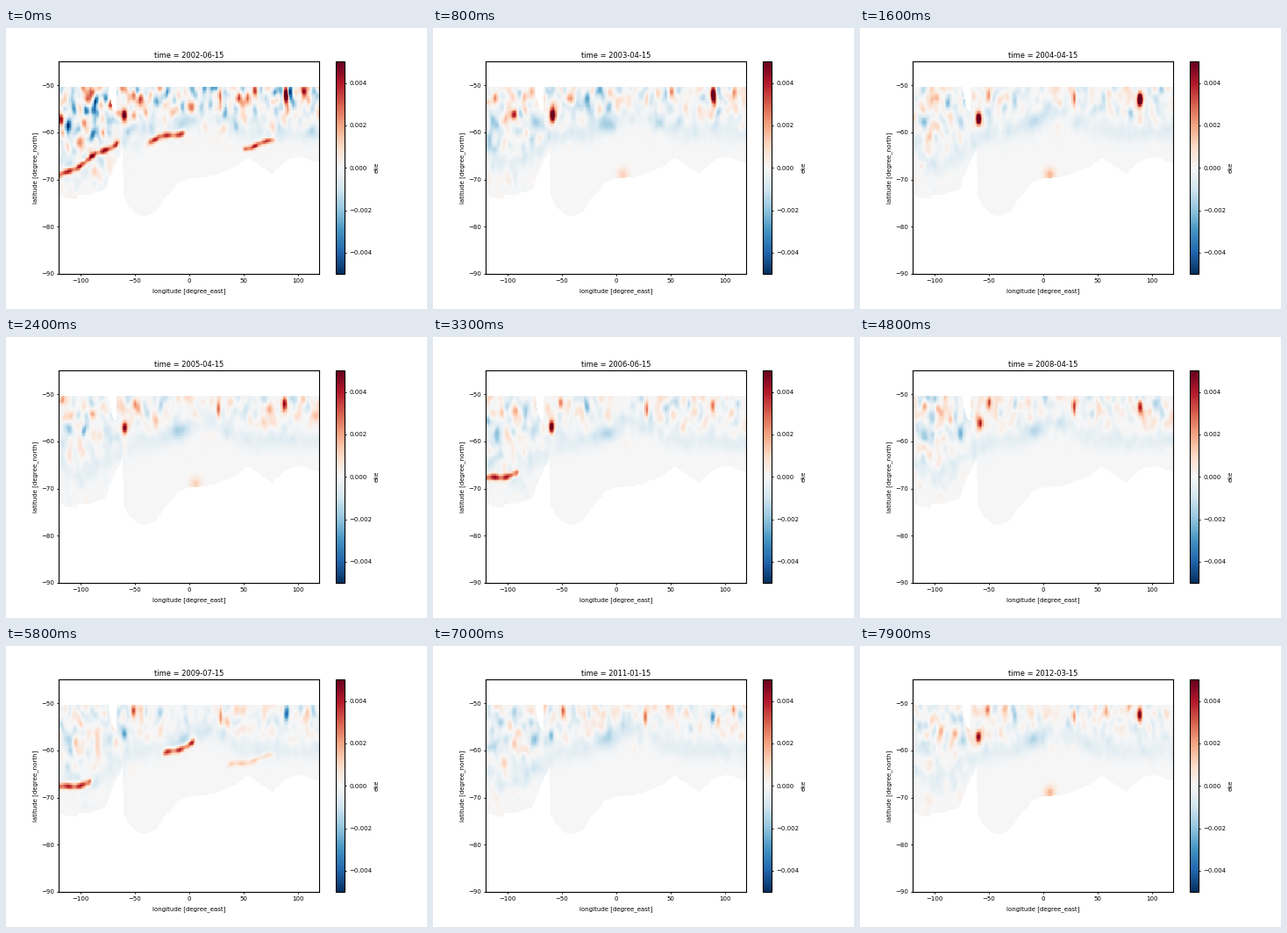
A matplotlib script for the animation above (8000 ms loop, 480 by 320 pixels).

```python
import numpy as np
import matplotlib.pyplot as plt
from matplotlib.animation import FuncAnimation

FRAMES, INTERVAL = 80, 100
MONTHS_PER_FRAME, START_HOLD = 1.5, 2

plt.rcParams.update({
    "font.family": "DejaVu Sans", "font.size": 10, "axes.linewidth": 1.6,
    "xtick.major.width": 1.4, "ytick.major.width": 1.4,
})

lon = np.arange(-119.5, 120)
lat = np.arange(-78.875, -50.5, 0.25)
depth = lat[:, None]

# Southern limit of open water, with the step at the peninsula
COAST = [
    (-120, -73.4), (-104, -74.2), (-102, -73.2), (-92, -73.2), (-77, -72.1),
    (-70, -67.6), (-60.6, -63.4), (-60.4, -73.2), (-55.6, -75.7), (-47.6, -77.3),
    (-41, -77.9), (-30, -76.6), (-23, -74.2), (-9.7, -70.6), (-1, -69.9),
    (21, -69.3), (43, -67.3), (54, -65.4), (76, -68.8), (89.5, -66),
    (102, -65.2), (120, -66.7),
]

# Eddies that stay near one place: lon, lat, strength, width, height
STANDING = [
    (-110, -58, -1.6, 3, 1.1), (-75, -58, -1.5, 3, 1.1), (-50, -52, 2.5, 1.5, 0.9),
    (-26, -52.7, -1.9, 1.7, 1.1), (-9, -58, -1.0, 6, 1.2), (28, -53, 2.6, 1.3, 1.3),
]
# The two strongest ones, which reverse for a while
REVERSING = [(-59, -56.7, 6, 1.8, 0.9), (88, -52.6, 6, 1.7, 1.0)]


def bell(x, centre, width):
    return np.exp(-0.5 * ((x - centre) / width) ** 2)


def spot(x, y, amp, sx, sy):
    return amp * bell(depth, y, sy) * bell(lon, x, sx)


def pulse(m, peak, period):
    """Positive half of a slow cycle."""
    return max(0, np.cos(2 * np.pi * (m - peak) / period))


def streak(x0, x1, y0, slope, amp, width=0.5):
    """Beaded line rising eastward from (x0, y0), with soft ends."""
    path = y0 + slope * (lon - x0) + 0.3 * np.sin(lon / 5)
    ends = np.clip((lon - x0) / 4 + 0.5, 0, 1) * np.clip((x1 - lon) / 4 + 0.5, 0, 1)
    beads = 1 + 0.25 * np.sin(lon * 0.55)
    return amp * ends * beads * bell(depth, path, width)


def water_mask():
    south = np.interp(lon, *np.transpose(COAST))
    west = np.interp(lat, [-56, -55, -50], [-67, -71, -75])[:, None]
    cape = (depth > -56) & (lon > west) & (lon < -67)
    return (depth > south) & ~cape


def smoother(axis, width):
    kernel = bell(axis[:, None], axis, width)
    return kernel / np.sqrt((kernel ** 2).sum(axis=0))


SMOOTH_X, SMOOTH_Y = smoother(lon, 1.9), smoother(lat, 0.85)
REACH = 5 + 6 * bell(lon, -100, 25)
ROUGH = bell(depth, -50.5, REACH) * (0.55 + 0.45 * np.abs(lon - 10) / 110)
PATH = -60 + 4.5 * bell(lon, 15, 18) - 7 * bell(lon, -98, 22)
CURRENT = -0.45 * bell(depth, PATH, 1.5)
WATER = water_mask()


def noise(m):
    rng = np.random.default_rng(500 + m)
    return SMOOTH_Y @ rng.standard_normal((lat.size, lon.size)) @ SMOOTH_X


def eddies(m):
    """Patchy eddies that last about two months and calm down with time."""
    n = 0.85 * noise(m) + 0.5 * noise(m - 1)
    gain = 0.55 + 1.0 * np.exp(-m / 7)
    return gain * ROUGH * np.sign(n) * np.abs(n) ** 1.4


def standing(m):
    rng = np.random.default_rng(900 + m)
    flip = 1 - 2 * bell(m, 94, 12)
    total = 0
    for x, y, amp, sx, sy in STANDING + REVERSING:
        dx, dy, change = rng.normal(0, [0.7, 0.3, 0.15])
        sign = flip if abs(amp) > 5 else 1
        total = total + spot(x + dx, y + dy, amp * sign * (1 + change), sx, sy)
    return total


def seasonal(m):
    """Winter streaks along the ice edge and an autumn patch in the south."""
    season = (m + 5) % 12
    early = np.exp(-m / 9)
    winter = bell(season, 5.5, 0.6)
    west = streak(-124, -90 + 25 * early, -68.2 - 1.9 * early, 0.04 + 0.095 * early, 5.5)
    cycle = pulse(m, 0, 86)
    middle = streak(-24 - 14 * early, 5 - 9 * early, -61 - early, 0.09 - 0.03 * early,
                    5 * cycle)
    east = streak(50 - 14 * (1 - early), 78, -63.4, 0.055, cycle * (1.6 + 3 * early), 0.4)
    patch = spot(6, -69, 2.4 * bell(season, 2.5, 0.6) * pulse(m, 22, 95), 3.5, 1)
    return winter * (west + middle + east) + patch


def field(m):
    total = CURRENT + eddies(m) + standing(m) + seasonal(m)
    return np.ma.masked_where(~WATER, total / 1000)


def month_at(i):
    return max(0, int(np.ceil(MONTHS_PER_FRAME * i)) - START_HOLD)


def title_at(m):
    year, month = divmod(m + 5, 12)
    return f"time = {2002 + year}-{month + 1:02d}-15"


fig, ax = plt.subplots(figsize=(9.6, 6.4), dpi=50, facecolor="white")
fig.subplots_adjust(left=0.125, right=0.8995, bottom=0.125, top=0.88)
image = ax.imshow(field(0), cmap="RdBu_r", vmin=-0.005, vmax=0.005, origin="lower",
                  extent=(-120, 120, -79, -50.5), aspect="auto",
                  interpolation="nearest")
ax.set(xlim=(-120, 120), ylim=(-90, -45), xticks=range(-100, 101, 50),
       yticks=range(-90, -49, 10))
ax.set_xlabel("longitude [degree_east]", labelpad=8)
ax.set_ylabel("latitude [degree_north]")
title = ax.set_title(title_at(0), fontsize=12, pad=7)
bar = fig.colorbar(image, ax=ax, fraction=0.15, pad=0.05, aspect=23.5,
                   ticks=np.arange(-4, 5, 2) / 1000)
bar.set_label("eke")


def update(i):
    m = month_at(i)
    image.set_data(field(m))
    title.set_text(title_at(m))
    return image, title


anim = FuncAnimation(fig, update, frames=FRAMES, interval=INTERVAL,
                     repeat=True, repeat_delay=0, blit=False)
plt.show()
```
